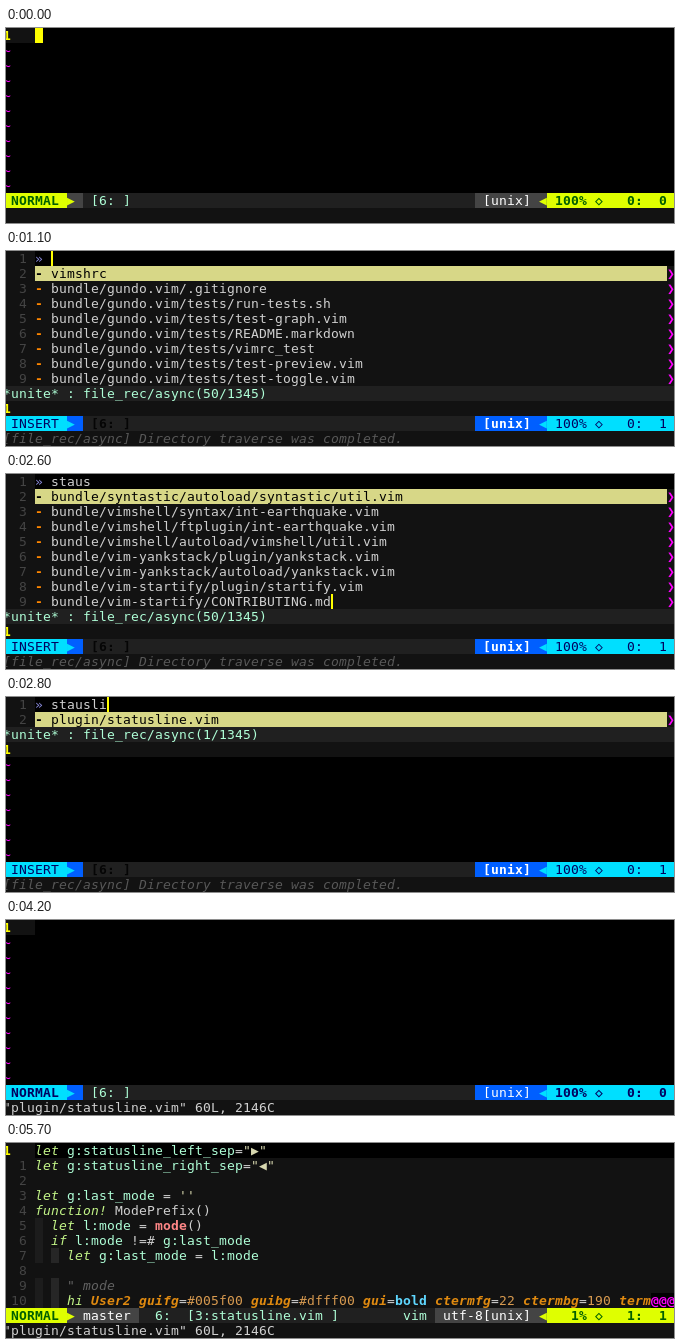
Animation, 668 px wide and 195 px high, one loop 5800 ms. Source, as an HTML page with a canvas:

```html
<!DOCTYPE html>
<html lang="en">
<head>
<meta charset="utf-8">
<title>Editor session</title>
<style>
html, body { margin: 0; width: 100%; height: 100%; overflow: hidden; background: #000; }
canvas { display: block; }
</style>
</head>
<body>
<canvas id="stage" width="668" height="195"></canvas>
<script>
const ctx = document.getElementById('stage').getContext('2d');
const LOOP = 5800, CW = 8, RH = 15, LEFT = -3, COLS = 84;
const BG = '#121212', BAR = '#202020', FG = '#d0d0d0', MINT = '#afffd7';
const YELLOW = '#ffff00', MAGENTA = '#ff00ff', DIM = '#444444', GREEN = '#c3f588';
const ORANGE = '#e08a10', AMBER = '#d79a50';
const MESSAGE = '[file_rec/async] Directory traverse was completed.';
const WRITTEN = '"plugin/statusline.vim" 60L, 2146C';

const THEMES = {
  lime: { main: '#dfff00', ink: '#005f00', side: '#444444' },
  cyan: { main: '#00dfff', ink: '#00005f', side: '#005fff' }
};

const FIRST = [
  'vimshrc',
  'bundle/gundo.vim/.gitignore',
  'bundle/gundo.vim/tests/run-tests.sh',
  'bundle/gundo.vim/tests/test-graph.vim',
  'bundle/gundo.vim/tests/README.markdown',
  'bundle/gundo.vim/tests/vimrc_test',
  'bundle/gundo.vim/tests/test-preview.vim',
  'bundle/gundo.vim/tests/test-toggle.vim'
];
const NARROWED = [
  'bundle/syntastic/autoload/syntastic/util.vim',
  'bundle/vimshell/syntax/int-earthquake.vim',
  'bundle/vimshell/ftplugin/int-earthquake.vim',
  'bundle/vimshell/autoload/vimshell/util.vim',
  'bundle/vim-yankstack/plugin/yankstack.vim',
  'bundle/vim-yankstack/autoload/yankstack.vim',
  'bundle/vim-startify/plugin/startify.vim',
  'bundle/vim-startify/CONTRIBUTING.md'
];
const MATCH = ['plugin/statusline.vim'];

// Time, typed query, candidates
const QUERY = [
  [1100, '', FIRST], [2100, 's', FIRST], [2200, 'st', FIRST],
  [2300, 'sta', NARROWED], [2400, 'stau', NARROWED], [2600, 'staus', NARROWED],
  [2700, 'stausl', NARROWED], [2800, 'stausli', MATCH], [2900, 'stausline', MATCH]
];

// Each line: indent, then text / colour / style triples
const LET = ['let ', GREEN, 'italic'];
const CODE = [
  [0, LET, ['g:statusline_left_sep', MINT], ['=', FG], ['"▶"', '#d7d7af']],
  [0, LET, ['g:statusline_right_sep', MINT], ['=', FG], ['"◀"', '#d7d7af']],
  [0],
  [0, LET, ['g:last_mode', MINT], [' = ', FG], ["''", '#d7d7af']],
  [0, ['function! ', GREEN, 'italic'], ['ModePrefix()', FG]],
  [2, LET, ['l:mode', MINT], [' = ', FG], ['mode', '#ff8787', 'bold'], ['()', FG]],
  [2, ['if ', GREEN, 'italic'], ['l:mode', MINT], [' !=# ', FG], ['g:last_mode', MINT]],
  [4, LET, ['g:last_mode', MINT], [' = ', FG], ['l:mode', MINT]],
  [0],
  [4, ['" mode', '#626262', 'italic']],
  [4, ['hi ', GREEN, 'italic'], ['User2 ', ORANGE, 'italic bold'],
    ...setting('guifg', '#005f00'), ...setting('guibg', '#dfff00'),
    ['gui', ORANGE, 'italic bold'], ['=', FG], ['bold ', '#5fd7ff', 'bold'],
    ...setting('ctermfg', '22'), ...setting('ctermbg', '190'),
    ['term', ORANGE, 'italic bold']]
];

function setting(key, value) {
  return [[key, ORANGE, 'italic bold'], ['=', FG], [value + ' ', AMBER]];
}

const colX = col => LEFT + col * CW;

function fill(col, row, cols, color, rows = 1) {
  ctx.fillStyle = color;
  ctx.fillRect(colX(col), row * RH, cols * CW, rows * RH);
}

function text(col, row, str, color, style = '') {
  ctx.font = `${style} 13px "DejaVu Sans Mono", monospace`;
  ctx.fillStyle = color;
  for (const ch of str) {
    if (ch !== ' ') ctx.fillText(ch, colX(col), row * RH + 12);
    col++;
  }
  return col;
}

function bar(col, row) {
  ctx.fillStyle = YELLOW;
  ctx.fillRect(colX(col), row * RH, 2, RH);
}

function tildes(from) {
  fill(0, from, COLS, '#000', 11 - from);
  for (let r = from; r < 11; r++) text(0, r, '~', MAGENTA);
}

function firstLine() {
  fill(4, 0, COLS - 4, '#000');
  text(0, 0, '1', YELLOW, 'bold');
}

function statusEnds(theme, mode, percent, line, column, weight) {
  const { main, ink, side } = THEMES[theme];
  fill(0, 11, COLS, BAR);
  fill(0, 11, 8, main);
  text(1, 11, mode, ink, weight);
  fill(8, 11, 2, side);
  text(8, 11, '▶', main);
  fill(67, 11, 1, side);
  text(67, 11, '◀', main);
  fill(68, 11, 16, main);
  text(69, 11, `${percent.padStart(4)} ◇   ${line}:  ${column}`, ink, weight);
}

function emptyStatus(theme, insert) {
  statusEnds(theme, insert ? 'INSERT' : 'NORMAL', '100%', 0, insert ? 1 : 0, insert ? '' : 'bold');
  text(11, 11, '[6: ]', insert ? '#050505' : MINT, insert ? 'bold' : '');
  fill(59, 11, 8, THEMES[theme].side);
  text(60, 11, '[unix]', '#fff', insert ? 'bold' : '');
}

function emptyBuffer(theme) {
  firstLine();
  tildes(1);
  emptyStatus(theme, false);
}

function finder(t) {
  const [start, query, files] = QUERY.filter(q => q[0] <= t).pop();
  const end = files.length + 1;
  fill(4, 0, COLS - 4, '#000');
  text(2, 0, '1', DIM);
  text(4, 0, '»', '#8787d7');
  text(6, 0, query, FG);
  files.forEach((name, i) => {
    const row = i + 1, chosen = i === 0;
    text(2, row, String(row + 1), DIM);
    if (chosen) fill(4, row, 79, '#d7d787');
    text(4, row, '-', chosen ? '#000' : '#ff8700', 'bold');
    text(6, row, name, chosen ? '#000' : FG);
    text(83, row, '❯', MAGENTA, 'bold');
  });
  fill(0, end, COLS, BAR);
  text(0, end, `*unite* : file_rec/async(${files === MATCH ? 1 : 50}/1345)`, MINT);
  text(0, end + 1, '1', YELLOW, 'bold');
  if (end + 2 < 11) tildes(end + 2);
  emptyStatus('cyan', true);
  text(0, 12, MESSAGE, '#585858', 'italic');
  // The cursor rests at the list's end while it redraws
  if (start === 2600) bar(6 + files[7].length, 8);
  else bar(6 + query.length, 0);
}

function opened() {
  firstLine();
  CODE.forEach(([indent, ...parts], row) => {
    if (row) text(1, row, String(row).padStart(2), DIM);
    if (indent >= 2) fill(4, row, 1, '#1c1c1c');
    if (indent >= 4) fill(6, row, 1, '#262626');
    let col = 4 + indent;
    for (const part of parts) col = text(col, row, ...part);
  });
  fill(81, 10, 3, '#000');
  text(81, 10, '@@@', MAGENTA, 'bold');
  statusEnds('lime', 'NORMAL', '1%', 1, 1, 'bold');
  fill(10, 11, 7, DIM);
  text(10, 11, 'master', '#fff');
  text(19, 11, '6:  [3:statusline.vim ]', MINT);
  text(50, 11, 'vim', MINT);
  fill(54, 11, 13, DIM);
  text(55, 11, 'utf-8[unix]', '#fff');
}

function draw(t) {
  ctx.fillStyle = BG;
  ctx.fillRect(0, 0, 668, 195);
  if (t < 1100) {
    emptyBuffer('lime');
    if (t < 300 || t >= 500) fill(4, 0, 1, YELLOW);
    if (t >= 1000) text(0, 12, MESSAGE, '#585858', 'italic');
  } else if (t < 4200) {
    finder(t);
  } else {
    if (t < 4400) emptyBuffer('cyan');
    else opened();
    text(0, 12, WRITTEN, FG);
    if ((t >= 4400 && t < 5100) || (t >= 5300 && t < 5700)) {
      fill(4, 0, 1, YELLOW);
      text(4, 0, 'l', '#000', 'italic');
    }
  }
}

const began = performance.now();
function tick() {
  draw((performance.now() - began) % LOOP);
  requestAnimationFrame(tick);
}
tick();
</script>
</body>
</html>
```
